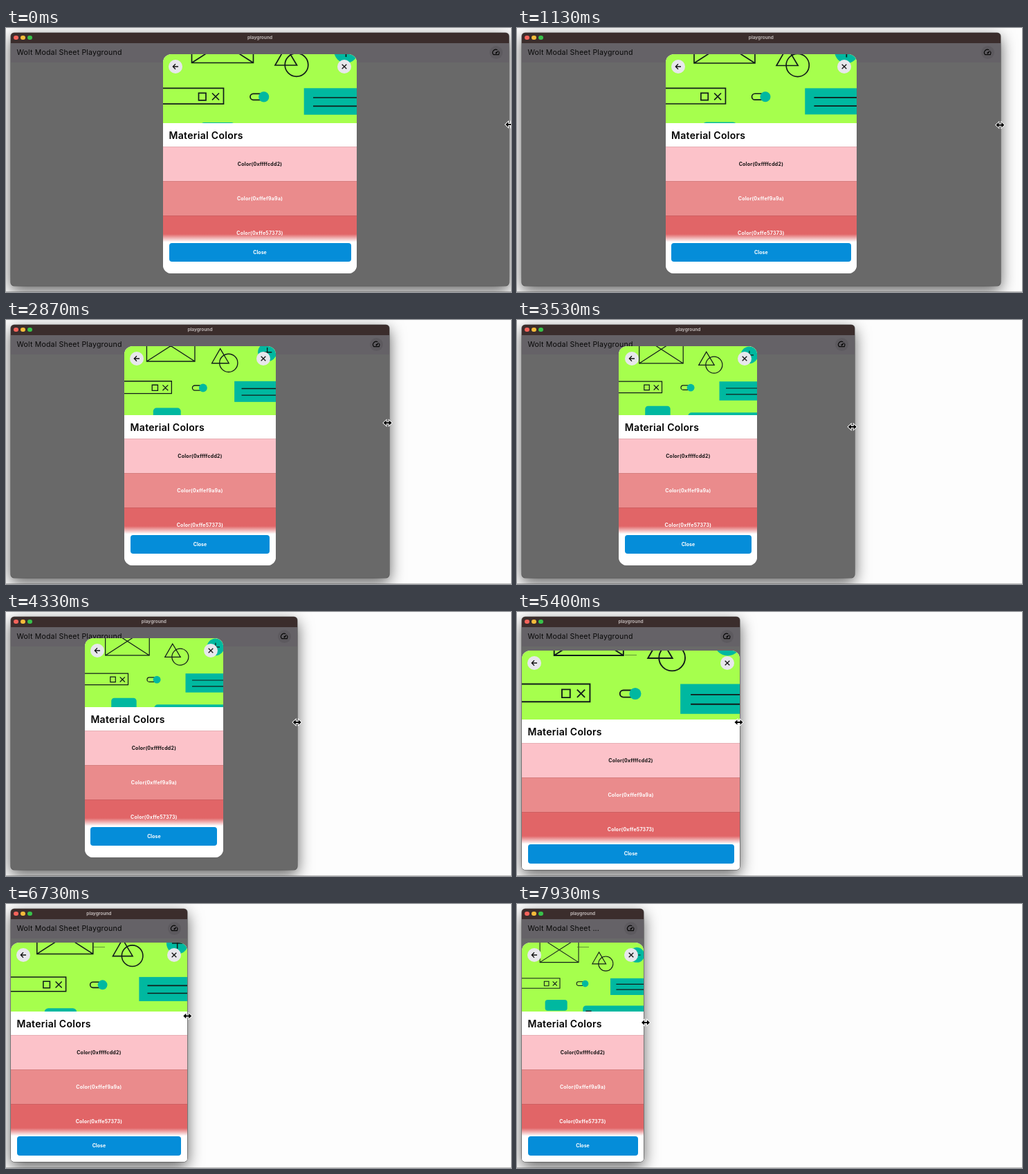
Animation, 730 px wide and 383 px high, one loop 8000 ms. Source, as an HTML page:

```html
<!DOCTYPE html>
<html lang="en">
<head>
<meta charset="utf-8">
<title>Modal sheet resize</title>
<style>
  html, body { margin: 0; width: 100%; height: 100%; overflow: hidden; background: #fdfdfd; }
  body { position: relative; font-family: Inter, "Open Sans", sans-serif; }
  body * { position: absolute; box-sizing: border-box; white-space: nowrap; }
  svg { overflow: visible; }
  svg * { position: static; }

  .floor { left: 0; right: 0; top: 382px; height: 1px; background: #bcbcbc; }
  .window {
    left: 7px; top: 7px; height: 367px; overflow: hidden; border-radius: 5px; background: #696969;
    box-shadow: 0 0 0 .6px rgba(0,0,0,.55), 0 7px 22px rgba(0,0,0,.64);
  }
  .titlebar {
    left: 0; right: 0; top: 0; height: 14.5px; background: #3b2d2c;
    color: #bdb5b4; font-size: 6.5px; font-weight: 700; line-height: 14.5px; text-align: center;
  }
  .light { top: 4px; width: 6.4px; height: 6.4px; border-radius: 50%; }
  .appbar { left: 0; right: 0; top: 14.5px; height: 28px; background: #656267; }
  .heading { left: 8.5px; top: 0; line-height: 28px; font-size: 10.6px; letter-spacing: .16px; color: #080808; }
  .gauge { right: 9px; top: 4px; width: 19px; height: 19px; border-radius: 50%; background: #5d5a5f; }

  .sheet { top: 31.3px; height: 317.5px; overflow: hidden; border-radius: 12px; background: #fff; }
  .hero { left: 0; top: 0; width: 100%; height: 100px; overflow: hidden; background: #a6ff4d; }
  .art { left: 0; top: 56px; width: 100%; height: 1px; }
  .handle { display: none; left: calc(50% - 8.5px); top: 6px; width: 17px; height: 1px; background: rgba(60,90,40,.65); }
  .round { top: 8px; width: 20px; height: 20px; border-radius: 50%; background: #e8e7ec; }
  .name { left: 8.5px; top: 100px; line-height: 35px; font-size: 14px; font-weight: 600; letter-spacing: .3px; color: #000; }
  .row {
    left: 0; width: 100%; height: 50px; border-top: 1px solid rgba(90,60,60,.14);
    line-height: 49px; text-align: center; font-size: 7px; font-weight: 700; letter-spacing: .25px; color: #fff;
  }
  .footer {
    left: 0; right: 0; bottom: 0; height: 56.5px;
    background: linear-gradient(rgba(255,255,255,0), #fff 11.5px);
  }
  .close {
    left: 8.5px; right: 8.5px; top: 12.5px; height: 27.5px; border-radius: 4px; background: #058dd9;
    color: #fff; font-size: 7px; font-weight: 700; line-height: 27.5px; text-align: center;
  }
  .docked { top: 49px; height: 318px; border-radius: 12px 12px 0 0; }
  .docked .handle { display: block; }
  .docked .footer { height: 49.5px; }
  .cursor { left: 0; top: 0; width: 1px; height: 1px; }
</style>
</head>
<body>
<div class="floor"></div>
<div class="window" id="win">
  <div class="titlebar">
    <span style="left:0;right:0">playground</span>
    <i class="light" style="left:4.3px;background:#f4635b"></i>
    <i class="light" style="left:14.3px;background:#f4bb3a"></i>
    <i class="light" style="left:24.3px;background:#38c24a"></i>
  </div>
  <div class="appbar">
    <span class="heading" id="heading"></span>
    <div class="gauge">
      <svg viewBox="-9.5 -9.5 19 19" width="19" height="19" fill="none" stroke="#080808" stroke-width="1.2">
        <path d="M1.8 -3.7A4.5 4.5 0 0 0 -3.8 3.2H3.8A4.5 4.5 0 0 0 3.9 -1.5"/>
        <path d="M4 -3.3L.9 1.6A1.1 1.1 0 0 1 -.8 .1Z" fill="#080808" stroke="none"/>
      </svg>
    </div>
  </div>
  <div class="sheet" id="sheet">
    <div class="hero">
      <svg class="art" preserveAspectRatio="none" id="art">
        <g fill="#00b8a0">
          <circle cx="264.5" cy="-60.5" r="17.3"/>
          <rect x="203.7" y="-6.7" width="90" height="38.5"/>
          <rect x="53.5" y="43" width="51" height="25" rx="6"/>
          <rect x="140.5" y="56.5" width="160" height="60" rx="7"/>
        </g>
        <g fill="none" stroke="#101c1a" stroke-width="1.7">
          <path d="M41.5 -101H130.5V-43.5H41.5ZL130.5 -43.5M130.5 -101L41.5 -43.5"/>
          <path d="M177.5 -67L162 -40H193.5Z"/>
          <circle cx="193" cy="-40.5" r="16.8"/>
          <path d="M264.5 -69V-52M256 -60.5H273"/>
          <path d="M-5 -6.7H87.5V16.2H-5M51.5 .3H62V10.8H51.5ZM71 .5L81 10.5M81 .5L71 10.5"/>
          <path d="M142 1.3H130.5A4.5 4.5 0 0 0 130.5 10.3H142"/>
          <path d="M217 7H290M217 19.3H290M147 69H160"/>
        </g>
        <circle cx="145.7" cy="5.8" r="7.6" fill="#00b8a0"/>
      </svg>
      <div class="handle"></div>
      <div class="round" style="left:8.3px">
        <svg viewBox="-10 -10 20 20" width="20" height="20" fill="none" stroke="#111" stroke-width="1.3"><path d="M4 0H-3.5M0 -3.7L-3.7 0L0 3.7"/></svg>
      </div>
      <div class="round" style="right:8.3px">
        <svg viewBox="-10 -10 20 20" width="20" height="20" fill="none" stroke="#111" stroke-width="1.3"><path d="M-3.3 -3.3L3.3 3.3M3.3 -3.3L-3.3 3.3"/></svg>
      </div>
    </div>
    <div class="name">Material Colors</div>
    <div class="row" style="top:134px;background:#fcc2c9;color:#111">Color(0xffffcdd2)</div>
    <div class="row" style="top:184px;background:#ea8b8c">Color(0xffef9a9a)</div>
    <div class="row" style="top:234px;background:#e16567">Color(0xffe57373)</div>
    <div class="footer"><div class="close">Close</div></div>
  </div>
</div>
<svg class="cursor" id="cursor">
  <path d="M-6 0L-2 -3.8V-1H2V-3.8L6 0L2 3.8V1H-2V3.8Z" fill="#000" stroke="#fff" stroke-width="1.8" paint-order="stroke"/>
</svg>
<script>
  const LOOP = 8000, FPS = 15, LEFT = 7;
  // time, right window edge, pointer offset from that edge, pointer y
  const KEYS = [
    [0, 727, 1, 140],
    [870, 714, 0, 140.5],
    [1730, 664, -1, 141],
    [2130, 644.5, -1, 142],
    [2600, 580, -2, 147],
    [3470, 495, -3, 154.5],
    [3530, 488, -3, 155],
    [4330, 421, 0, 160],
    [4930, 378, 0, 160],
    [5000, 378, 0, 160],
    [5400, 322, -1.5, 160],
    [5800, 311, 0, 161],
    [5870, 311, 0, 161],
    [6730, 262, .5, 162.5],
    [7600, 206, 2, 170],
    [7930, 183, 3, 172],
    [8000, 183, 3, 172]
  ];
  const $ = id => document.getElementById(id);
  const win = $('win'), sheet = $('sheet'), art = $('art'), heading = $('heading'), cursor = $('cursor');
  const clamp = (v, lo, hi) => Math.min(hi, Math.max(lo, v));

  function pose(t) {
    const next = Math.max(1, KEYS.findIndex(k => k[0] >= t));
    const a = KEYS[next - 1], b = KEYS[next];
    const p = clamp((t - a[0]) / (b[0] - a[0]), 0, 1);
    return a.map((v, i) => v + (b[i] - v) * p);
  }

  function draw(t) {
    const [, edge, offset, y] = pose(t);
    const width = edge - LEFT;
    const docked = width < 384;
    const sheetWidth = docked ? width : clamp(width * .4, 200, 280);
    win.style.width = width + 'px';
    sheet.classList.toggle('docked', docked);
    sheet.style.width = sheetWidth + 'px';
    sheet.style.left = (width - sheetWidth) / 2 + 'px';
    art.setAttribute('viewBox', `0 0 280 ${280 / sheetWidth}`);
    heading.textContent = 'Wolt Modal Sheet ' + (edge < 205 ? '...' : 'Playground');
    cursor.style.transform = `translate(${edge + offset}px, ${y}px)`;
  }

  let start;
  function tick(now) {
    start ??= now;
    const t = (now - start) % LOOP;
    draw(Math.floor((t + 5) * FPS / 1000) * 1000 / FPS);
    requestAnimationFrame(tick);
  }
  draw(0);
  requestAnimationFrame(tick);
</script>
</body>
</html>
```
